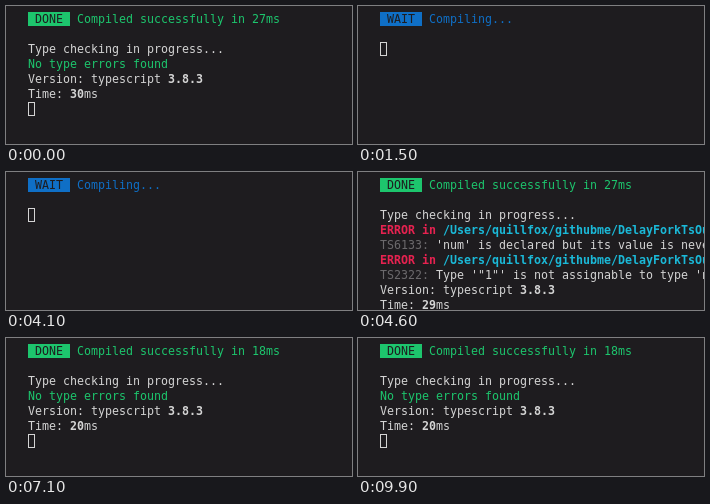
An HTML page with a canvas that plays this animation: 346 px wide and 138 px high, repeating every 10 s.

```html
<!DOCTYPE html>
<html lang="en">
<head>
<meta charset="utf-8">
<title>Terminal</title>
<style>
  html, body { margin: 0; width: 346px; height: 138px; overflow: hidden; background: #1e1c1f; }
  canvas { display: block; }
</style>
</head>
<body>
<canvas width="346" height="138"></canvas>
<script>
const ctx = document.querySelector('canvas').getContext('2d', { alpha: false });
const LOOP = 10000, LEFT = 22, TOP = 6, CELL = 7, LINE = 15;
const BG = '#1e1c1f', TEXT = '#d4d4d4', GREEN = '#1dc56d', BLUE = '#0f6fc6',
      RED = '#e62250', CYAN = '#1bb9d8', GREY = '#6b696c';

// A line is a list of runs; a screen is a list of lines.
const run = (text, color = TEXT, bold = false) => ({ text, color, bold });
const badge = (label, color, message) =>
  [{ text: ` ${label} `, color: BG, back: color }, run(' ' + message, color)];
const issue = (code, message) => [
  [run('ERROR in ', RED, true), run('/Users/quillfox/githubme/DelayForkTsOut', CYAN, true)],
  [run(code + ': ', GREY), run(message)]
];
const unread = name => issue('TS6133', `'${name}' is declared but its value is never read.`);
const mismatch = issue('TS2322', `Type '"1"' is not assignable to type 'number'.`);
const summary = ms => [
  [run('Version: typescript '), run('3.8.3', TEXT, true)],
  [run('Time: '), run(ms, TEXT, true), run('ms')]
];
const clean = [[run('No type errors found', GREEN)]];

const waiting = [badge('WAIT', BLUE, 'Compiling...'), []];
const done = (ms, ...rest) => [
  badge('DONE', GREEN, `Compiled successfully in ${ms}ms`), [],
  [run('Type checking in progress...')], ...rest.flat()
];

const timeline = [
  [0, done(27, clean, summary(30))],
  [1500, waiting],
  [1800, done(26)],
  [2000, done(26, unread('num'), mismatch, unread('unused'))],
  [4100, waiting],
  [4400, done(27)],
  [4600, done(27, unread('num'), mismatch, summary(29))],
  [6400, waiting],
  [6700, done(18)],
  [6900, done(18, clean, summary(20))]
];

function drawLine(runs, row) {
  let x = LEFT;
  const y = TOP + row * LINE;
  for (const { text, color, bold, back } of runs) {
    const width = String(text).length * CELL;
    if (back) {
      ctx.fillStyle = back;
      ctx.fillRect(x, y, width, 14);
    }
    ctx.font = `${bold ? 'bold ' : ''}11.63px "DejaVu Sans Mono", monospace`;
    ctx.fillStyle = color;
    ctx.fillText(text, x, y + 11);
    x += width;
  }
}

function frame() {
  const t = performance.now() % LOOP;
  const [, lines] = timeline.filter(([start]) => start <= t).pop();
  ctx.fillStyle = BG;
  ctx.fillRect(0, 0, 346, 138);
  lines.forEach(drawLine);
  ctx.strokeStyle = TEXT;
  ctx.strokeRect(LEFT + 0.5, TOP + lines.length * LINE + 0.5, 6, 13);
  requestAnimationFrame(frame);
}
frame();
</script>
</body>
</html>
```
